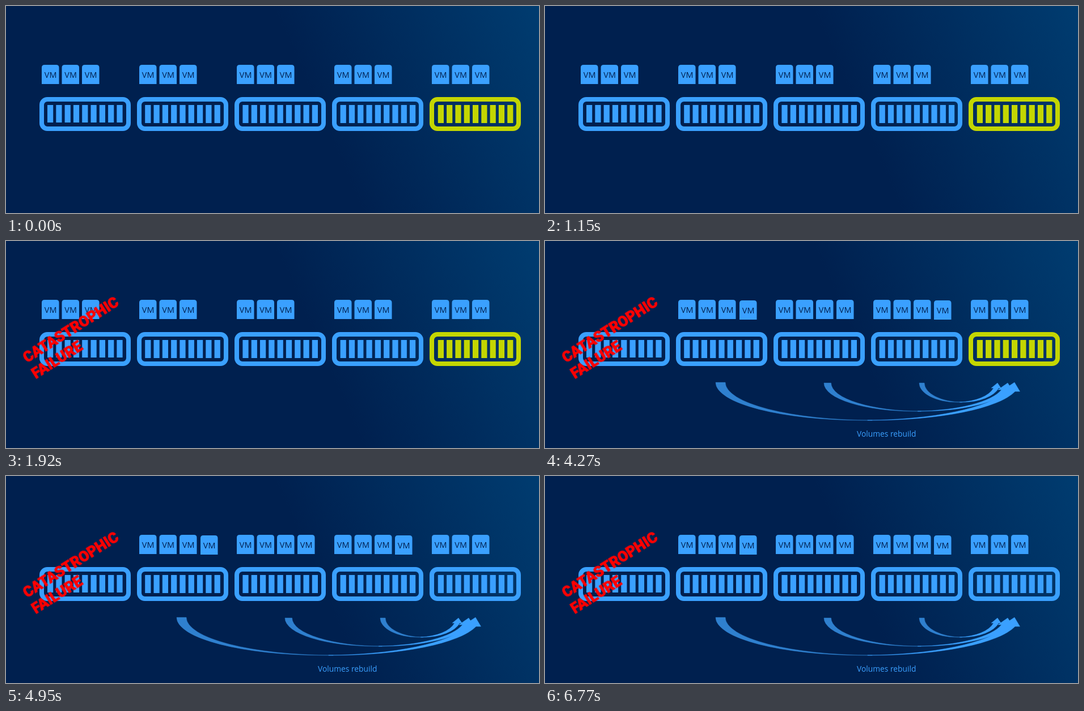
Recreate the animation shown at these times as an HTML page. Size 940 px wide and 366 px high, loop 7980 ms.

```html
<!DOCTYPE html>
<html lang="en">
<head>
<meta charset="utf-8">
<title>Volume rebuild</title>
<style>
  html, body { margin: 0; width: 100%; height: 100%; overflow: hidden; background: #00204f; }
  svg { display: block; width: 940px; height: 366px; }
  text { font-family: "Open Sans", "Noto Sans", sans-serif; }
  .vm text { font-size: 14.4px; fill: #00204f; text-anchor: middle; }
  .vm path, .light { fill: #3aa0ff; }
  .light { stroke: #3aa0ff; stroke-width: .5; }
  .dark { fill: #2f80cf; stroke: #2f80cf; stroke-width: .5; }
  .server { color: #3aa0ff; }
  .server .frame { fill: none; stroke: currentColor; stroke-width: 8; }
  .server .bar { fill: currentColor; }
  #failure text { font: 900 26px Roboto, Inter, sans-serif; fill: #f00; stroke: #f00; stroke-width: .8; }
  #label { font-size: 13.8px; fill: #3aa0ff; }
</style>
</head>
<body>
<svg id="stage" viewBox="0 0 940 366">
  <defs>
    <linearGradient id="sky" gradientUnits="userSpaceOnUse" x1="470" y1="0" x2="864" y2="-172">
      <stop offset="0" stop-color="#00204f"/>
      <stop offset="1" stop-color="#003c70"/>
    </linearGradient>
  </defs>
  <rect width="940" height="366" fill="url(#sky)"/>
  <g id="servers"></g>
  <g id="vms"></g>
  <g id="rebuild"><text id="label" x="550" y="346">Volumes rebuild</text></g>
  <g id="failure" transform="translate(37 216) rotate(-32.2)">
    <text x="0" y="0">CATASTROPHIC</text>
    <text x="-2" y="31.5">FAILURE</text>
  </g>
</svg>
<script>
const LOOP = 7980, FAIL = 1920, MOVE = 3250, DONE = 4950;
const BLUE = '#3aa0ff', LIME = '#c4d600', PITCH = 172;
const $ = id => document.getElementById(id);

function add(parent, tag, attrs = {}, text = '') {
  const el = document.createElementNS('http://www.w3.org/2000/svg', tag);
  for (const key in attrs) el.setAttribute(key, attrs[key]);
  el.textContent = text;
  parent.append(el);
  return el;
}

function addVm(parent, x, y = 104) {
  const g = add(parent, 'g', { class: 'vm', transform: `translate(${x} ${y})` });
  add(g, 'path', { d: 'M0 34V5Q0 0 5 0H25.5Q30.5 0 30.5 5V34Z' });
  add(g, 'text', { x: 15.6, y: 23 }, 'VM');
}

function addServer(i) {
  const g = add($('servers'), 'g', { class: 'server' });
  add(g, 'rect', { class: 'frame', x: 63 + i * PITCH, y: 165, width: 153, height: 52, rx: 10 });
  for (let b = 0; b < 9; b++) {
    add(g, 'rect', {
      class: 'bar', x: 73 + i * 172.2 + b * 15.3, y: 175,
      width: 10.2, height: i ? 32 : 31
    });
  }
  return g;
}

// Curved arrow made of two equal ellipses, one shifted right by the tail width.
function addArrow(x, y, tail, tip, depth, head, span) {
  const r = (tip - x - tail / 2) / 2, c1 = x + r, c2 = c1 + tail;
  const low = y + depth, base = y + head;
  const reach = r * Math.sqrt(1 - (head / depth) ** 2);
  const left = c1 + reach, right = c2 + reach;
  const mid = (c1 + c2) / 2, wing = (span - tail) / 2;
  const midY = y + depth * Math.sqrt(1 - (tail / 2 / r) ** 2);
  const arc = (sweep, px, py) => `A${r} ${depth} 0 0 ${sweep} ${px} ${py}`;
  add($('rebuild'), 'path', {
    class: 'dark',
    d: `M${x} ${y}${arc(0, c1, low)}H${c2}${arc(1, x + tail, y)}Z`
  });
  add($('rebuild'), 'path', {
    class: 'light',
    d: `M${tip} ${y}L${left - wing} ${base}H${left}${arc(1, mid, midY)}` +
       `L${c2} ${low}${arc(0, right, base)}H${right + wing}Z`
  });
}

// Each step is [time, style]; a style holds until the next step.
function play(el, steps) {
  const frames = steps.map(([t, style]) => ({ ...style, offset: t / LOOP, easing: 'step-end' }));
  frames.push({ ...steps[steps.length - 1][1], offset: 1 });
  el.animate(frames, { duration: LOOP, iterations: Infinity });
}

const on = { opacity: 1 }, off = { opacity: 0 };
const lost = add($('vms'), 'g'), moved = add($('vms'), 'g');
let last;
for (let i = 0; i < 5; i++) {
  last = addServer(i);
  for (const dx of [0, 35.5, 71]) addVm(i ? $('vms') : lost, 63 + i * PITCH + dx);
}
addVm(moved, 343, 105);
addVm(moved, 514);
addVm(moved, 686, 105);

addArrow(301, 250, 17, 828, 67, 16, 34);
addArrow(492, 251, 12.5, 816, 50, 12, 25);
addArrow(660, 251, 9, 798, 34, 9, 17);

play(lost, [[0, on], [MOVE, off]]);
play(moved, [[0, off], [MOVE, on]]);
play($('failure'), [[0, off], [FAIL, on]]);
play($('rebuild'), [[0, off], [MOVE, on]]);
play(last, [[0, { color: LIME }], [DONE, { color: BLUE }]]);
</script>
</body>
</html>
```
